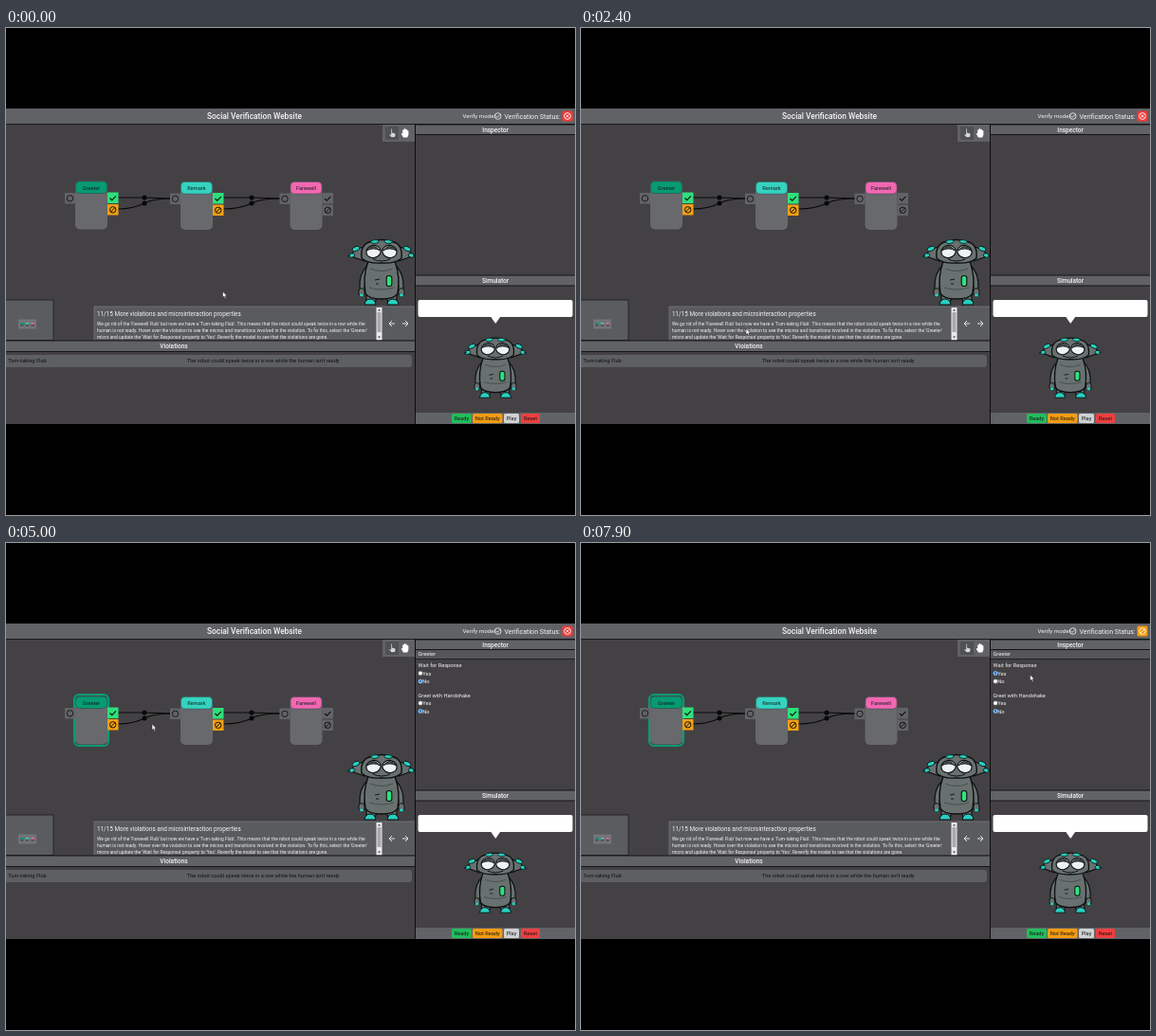
Write an HTML page with a canvas that moves like this. It is 600 px wide and 514 px high and loops after 8 s.

```html
<!DOCTYPE html>
<html lang="en">
<head>
<meta charset="utf-8">
<title>Social Verification Website</title>
<style>
html, body { margin: 0; width: 100%; height: 100%; overflow: hidden; background: #000; }
canvas { display: block; width: 600px; height: 514px; }
</style>
</head>
<body>
<canvas id="stage"></canvas>
<script>
const canvas = document.getElementById('stage');
const dpr = window.devicePixelRatio || 1;
canvas.width = 600 * dpr;
canvas.height = 514 * dpr;
const c = canvas.getContext('2d');

const LOOP = 8000, STEP = 100;
const DARK = '#434144', BAR = '#616266', INK = '#111113', WHITE = '#f4f4f4';
const GREEN = '#079a73', TEAL = '#35d3c0', PINK = '#f267b2';
const OK = '#2ee07c', WARN = '#f5a010', RED = '#e81616';

// Cursor waypoints: time, x, y
const path = [
  [0, 228.5, 278], [100, 228, 279], [700, 188, 346], [900, 187, 349], [2000, 187, 349.5],
  [2800, 161, 285], [3100, 123, 249], [3700, 89, 197], [4800, 89, 197],
  [5000, 154, 191], [5600, 464, 149], [6300, 434.5, 138], [7400, 434.5, 138],
  [7800, 473.5, 139], [8000, 473.5, 139]
];

function cursorAt(t) {
  let i = 1;
  while (path[i][0] < t) i++;
  const a = path[i - 1], b = path[i], k = (t - a[0]) / (b[0] - a[0]);
  return [a[1] + (b[1] - a[1]) * k, a[2] + (b[2] - a[2]) * k];
}

function rect(x, y, w, h, fill) {
  c.fillStyle = fill;
  c.fillRect(x, y, w, h);
}

function paint(fill, stroke, width = 1) {
  if (fill) { c.fillStyle = fill; c.fill(); }
  if (stroke) { c.strokeStyle = stroke; c.lineWidth = width; c.stroke(); }
}

function round(x, y, w, h, r, fill, stroke, width) {
  c.beginPath();
  c.roundRect(x, y, w, h, r);
  paint(fill, stroke, width);
}

function oval(x, y, rx, ry, fill, stroke, width, turn = 0) {
  c.beginPath();
  c.ellipse(x, y, rx, ry, turn, 0, Math.PI * 2);
  paint(fill, stroke, width);
}

const dot = (x, y, r, fill, stroke, width) => oval(x, y, r, r, fill, stroke, width);

function line(pts, stroke, width = 1) {
  c.beginPath();
  pts.forEach(([x, y]) => c.lineTo(x, y));
  paint(null, stroke, width);
}

function shape(d, fill, stroke, width = 1) {
  const p = new Path2D(d);
  if (fill) { c.fillStyle = fill; c.fill(p); }
  if (stroke) { c.strokeStyle = stroke; c.lineWidth = width; c.stroke(p); }
}

function text(str, x, y, size = 5.67, fill = WHITE, align = 'left', weight = 400) {
  c.font = `${weight} ${size}px Roboto, sans-serif`;
  c.textAlign = align;
  c.fillStyle = fill;
  c.fillText(str, x, y);
}

const check = (x, y, s, col, w) => line([[x - s, y], [x - s * .3, y + s * .7], [x + s, y - s * .7]], col, w);

function ban(x, y, r, col) {
  dot(x, y, r, null, col, 1);
  line([[x - r * .7, y + r * .7], [x + r * .7, y - r * .7]], col, 1);
}

function cross(x, y, r, col, ring = true) {
  if (ring) dot(x, y, r, null, col, 1);
  const s = r * .45;
  line([[x - s, y - s], [x + s, y + s]], col);
  line([[x + s, y - s], [x - s, y + s]], col);
}

function titleBar(label, x, y, w, h) {
  rect(x, y - 1, w, h + 2, '#151516');
  rect(x, y, w, h, BAR);
  text(label, x + w / 2, y + h / 2 + 2.3, 6.5, WHITE, 'center', 500);
}

function node(x, y, label, col, outline, live) {
  if (outline) round(x - 1, y - 1.5, 36, 54, 5, null, outline, 2.2);
  round(x, y, 34, 51, 5, '#68696d');
  round(x + .5, y + .5, 33, 12.5, 4, col, 'rgba(20,50,50,.45)', .8);
  text(label, x + 17, y + 9, 5.67, '#10201f', 'center');

  rect(x - 11, y + 12.5, 11, 11.5, '#626367');
  dot(x - 5.5, y + 18.3, 3.2, null, INK, .9);
  rect(x + 34, y + 12, 11.5, 11.5, live ? OK : '#626367');
  check(x + 39.7, y + 18, 3.2, INK, 1.1);
  rect(x + 34, y + 24.5, 11.5, 11.5, live ? WARN : '#626367');
  ban(x + 39.7, y + 30.3, 3.2, INK);
}

function links(x0, xm, x1, bad) {
  line([[x0, 179], [xm, 179], [x1, 180]], '#080808', 1.1);
  dot(xm, 179, 2.5, '#080808');
  const col = bad ? '#c91d1d' : '#080808';
  c.beginPath();
  c.moveTo(x0, 191);
  c.quadraticCurveTo(xm - 12, 191, xm, 185);
  c.quadraticCurveTo(xm + 10, 180, x1, 180);
  paint(null, col, 1.1);
  if (bad) {
    dot(xm - .5, 185, 4.5, '#d92020');
    cross(xm - .5, 185, 3, '#4a1515');
  } else dot(xm, 185, 2.5, col);
}

function robot(x, y, scale) {
  const skin = '#68716f', aqua = '#27d0c0', k = '#0c0f10';
  c.save();
  c.translate(x, y);
  c.scale(scale, scale);
  c.lineJoin = 'round';
  // Legs and feet
  for (const s of [-1, 1]) {
    round(s * 11 - 5, 22, 10, 10, 2, skin, k, 1.2);
    shape(`M${s * 12 - 6} 35Q${s * 12 - 5} 29 ${s * 12} 29T${s * 12 + 6} 35Z`, aqua, k, 1);
  }
  // Arms
  for (const s of [-1, 1]) {
    shape(`M${s * 15} -6Q${s * 24} 2 ${s * 23} 19L${s * 18} 20Q${s * 18} 8 ${s * 12} 4Z`, skin, k, 1.2);
    oval(s * 21, 22, 3.1, 4.2, skin, k, 1);
    oval(s * 21, 25, 2, 1.5, aqua);
  }
  // Body
  shape('M-14 -11Q-20 6 -17 23Q-14 29 0 29Q14 29 17 23Q20 6 14 -11Z', skin, k, 1.4);
  shape('M-13 17Q0 21 13 17M-12 -3Q0 2 12 -3', null, '#3d4746', .8);
  line([[-7, 9], [-2, 8]], k, .9);
  line([[-6, 13], [-3, 13]], k, .9);
  round(5.2, 4.5, 5.6, 11, 2.4, '#2ee27c', k, 1.1);
  // Ears
  for (const s of [-1, 1]) {
    shape(`M${s * 15} -27L${s * 29} -23L${s * 32} -16L${s * 18} -11Z`, skin, k, 1.3);
    oval(s * 27, -24, 4.2, 2.3, aqua, k, .9, s * .4);
    oval(s * 31.5, -17, 3.2, 2.2, aqua, k, .9, s * .2);
    line([[s * 33, -17], [s * 35.5, -16]], k, 1);
  }
  // Head
  shape('M-21 -14Q-23 -31 -8 -32Q0 -35 8 -32Q23 -31 21 -14Q14 -8 0 -9Q-14 -8 -21 -14Z', skin, k, 1.4);
  oval(-7, -31.5, 4.2, 1.9, aqua, k, .8, -.1);
  oval(7, -31.5, 4.2, 1.9, aqua, k, .8, .1);
  for (const s of [-1, 1]) {
    oval(s * 8.5, -21, 7.7, 6.5, '#eef2f2', k, 1.2, s * .2);
    shape(`M${s * 1.5} -22Q${s * 8} -31 ${s * 16} -22Q${s * 8} -26 ${s * 1.5} -22Z`, '#4e5856', k, .8);
  }
  shape('M-9 -13Q0 -9 9 -13', null, k, 1);
  c.restore();
}

function handIcons() {
  rect(397, 102, 34, 18, BAR);
  rect(400, 104, 14, 14, '#505155');
  shape('M405.8 106.5q1-1 1.5 0v3.8l3 .8q1 .5.6 1.8l-.7 2.7h-4l-2.5-3.4q.6-1 2.1.2z', '#d8d8d8', '#242426', .5);
  shape('M419 115.5l-2.3-4q.2-1.2 1.6.1l-.2-3.9q.8-1.1 1.4 0l.3-1.3q.8-.9 1.4 0l.3.7q.9-.8 1.4.1l.2 1.1q1-.6 1.3.4v4l-1.2 2.8z', '#fff');
}

function tutorial() {
  rect(93, 294, 338, 35.5, '#5a5b5f');
  shape('M93 329.5V294H431', null, '#77787c', .8);
  text('11/15 More violations and microinteraction properties', 96, 304.3, 6.34);
  [
    "We go rid of the 'Farewell Flub' but now we have a 'Turn-taking Flub'. This means that the robot could speak twice in a row while the",
    "human is not ready. Hover over the violation to see the micros and transitions involved in the violation. To fix this, select the 'Greeter'",
    "micro and update the 'Wait for Response' property to 'Yes'. Reverify the model to see that the violations are gone."
  ].forEach((s, i) => text(s, 96, 313.9 + i * 7, 4.9));
  rect(390.5, 295, 6, 34.5, '#ececec');
  rect(391.5, 300, 4, 21, '#a9a9ab');
  shape('M392 298.4l1.5-2 1.5 2zM392 325.5l1.5 2 1.5-2z', '#444');
  for (const [x, s] of [[407, -1], [421, 1]]) {
    line([[x - 3 * s, 312], [x + 3 * s, 312]], WHITE, .9);
    line([[x, 309], [x + 3 * s, 312], [x, 315]], WHITE, .9);
  }
}

function minimap() {
  round(-1, 287, 51, 42.5, 0, '#5b5c60', '#1b1b1d', .8);
  rect(13, 307.5, 19, 10, '#737478');
  [GREEN, TEAL, PINK].forEach((col, i) => {
    rect(15 + i * 5.7, 311, 3.4, 4, '#55565a');
    rect(15 + i * 5.7, 311, 3.4, 1.6, col);
  });
}

function radio(label, y, on) {
  dot(437, y, 2.2, '#fff', on ? '#1a78d8' : '#777', .5);
  if (on) dot(437, y, 1.4, '#1a78d8');
  text(label, 439.3, y + 2.1);
}

function inspector(yes) {
  rect(432, 113, 168, 9, '#565659');
  rect(432, 122, 168, .8, '#19191a');
  text('Greeter', 434.5, 119.3);
  text('Wait for Response', 434.5, 131.2);
  radio('Yes', 137.5, yes);
  radio('No', 146, !yes);
  text('Greet with Handshake', 434.5, 162.6);
  radio('Yes', 169, false);
  radio('No', 177.5, true);
}

function simulator() {
  titleBar('Simulator', 432, 261.5, 168, 10);
  round(434.5, 287, 163, 18, 2, '#fff');
  shape('M511 304.5h10.5L516.2 312z', '#fff');
  robot(516, 358, .92);
  rect(432, 406, 168, 12, BAR);
  [
    ['Ready', 470, 21, '#22bd5c'], ['Not Ready', 492, 31.5, '#f39c12'],
    ['Play', 525, 16, '#cfd1d3'], ['Reset', 543, 20, '#ef3f3f']
  ].forEach(([s, x, w, col]) => {
    round(x, 407, w, 10, 1.5, col);
    text(s, x + w / 2, 414, 5.67, '#141414', 'center');
  });
}

function header(fixed) {
  rect(0, 85, 600, 16.5, BAR);
  rect(0, 101, 600, 1, '#19191a');
  text('Social Verification Website', 262, 96, 8.35, WHITE, 'center', 500);
  text('Verify model', 481.5, 95.2, 6.2);
  dot(518.7, 93, 3.3, null, WHITE, .8);
  check(518.9, 92.8, 2.2, WHITE, .8);
  text('Verification Status:', 525.5, 95.6, 7.05);
  round(586.5, 87.5, 11, 11, 1.5, fixed ? '#f39c12' : '#ee3b3b');
  if (fixed) ban(592, 93, 3.3, '#fff0d0');
  else cross(592, 93, 3.4, '#ffe2e2');
}

function draw(t) {
  const hover = t >= 700 && t < 2300;
  const picked = t >= 3900;
  const fixed = t >= 7000;
  c.setTransform(dpr, 0, 0, dpr, 0, 0);
  c.lineCap = 'butt';
  rect(0, 0, 600, 514, '#000');
  rect(0, 85, 600, 333, DARK);
  header(fixed);
  handIcons();

  links(118, 146, 173, hover);
  links(229, 259, 289, false);
  node(73, 161.5, 'Greeter', GREEN, hover ? RED : picked && GREEN, true);
  node(184, 162, 'Remark', TEAL, hover && RED, true);
  node(299.5, 162, 'Farewell', PINK, null, false);

  minimap();
  robot(396, 257, 1);
  tutorial();

  titleBar('Violations', 0, 330.5, 354, 10.5);
  rect(354, 329.5, 77, 12.5, '#151516');
  rect(354, 330.5, 77, 10.5, BAR);
  round(-3, 345, 431, 13, 3, hover ? '#4a494c' : '#5e5f63');
  text('Turn-taking Flub', 2.2, 353.2, 5.67, INK);
  text("The robot could speak twice in a row while the human isn't ready", 190.8, 353.2, 5.65, INK);

  titleBar('Inspector', 432, 102.5, 168, 9.5);
  if (picked) inspector(fixed);
  simulator();
  rect(431, 102, 1, 316, '#0d0d0e');

  const [x, y] = cursorAt(t);
  c.save();
  c.translate(x, y);
  shape('M0 0V6.4L1.5 5.1 2.5 7.4 3.7 6.9 2.7 4.7H4.6Z', '#fff', '#1a1a1a', .5);
  c.restore();
}

function tick(now) {
  const t = now % LOOP;
  draw(Math.floor(t / STEP) * STEP);
  requestAnimationFrame(tick);
}
requestAnimationFrame(tick);
</script>
</body>
</html>
```
